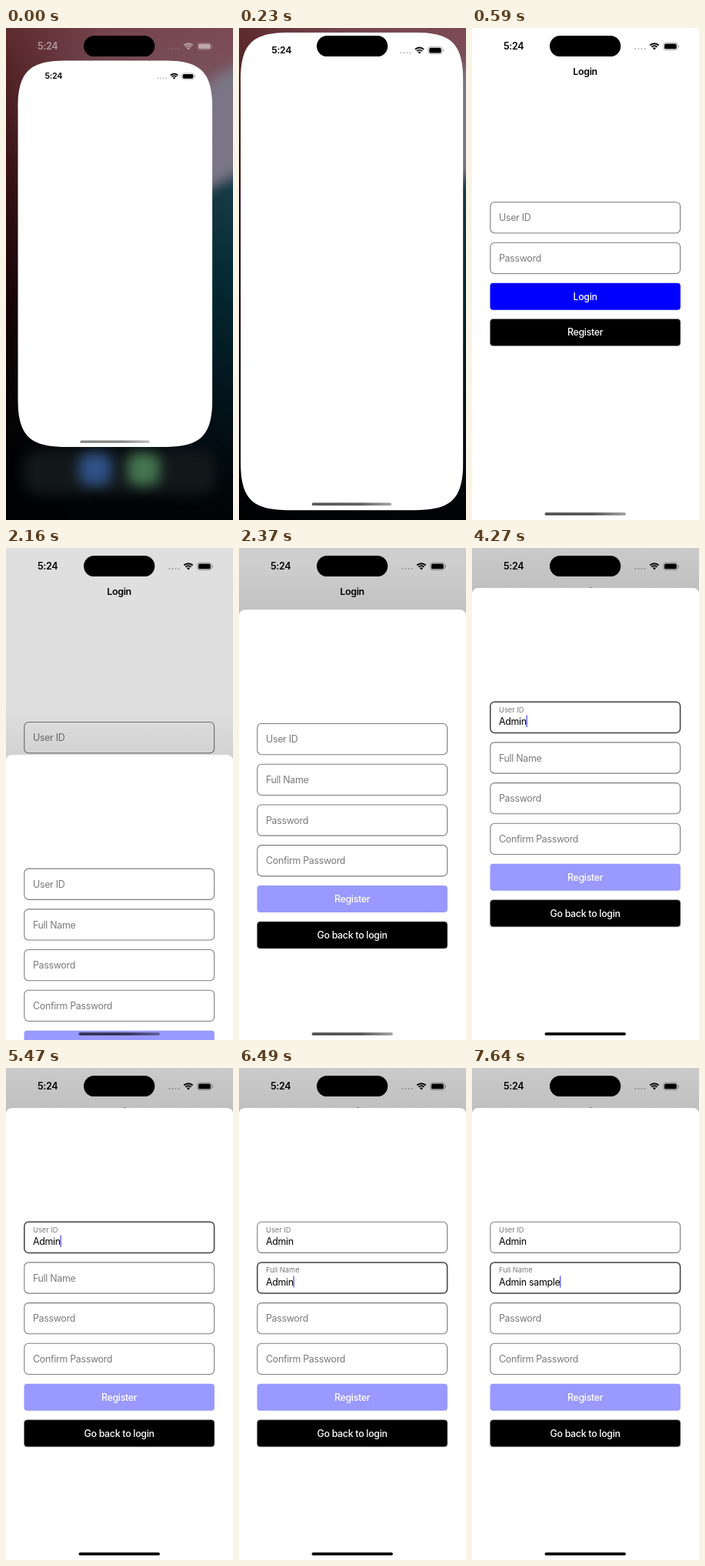
Recreate the animation shown at these times as an HTML page. Size 295x640 px, loop 8000 ms.

```html
<!DOCTYPE html>
<html lang="en">
<head>
<meta charset="utf-8">
<title>Sign-up flow</title>
<style>
  html, body { margin: 0; height: 100%; overflow: hidden; background: #fff; }
  svg { display: block; width: 100vw; height: 100vh; font-family: Inter, Roboto, sans-serif; }
  text { white-space: pre; }
</style>
</head>
<body>
<svg viewBox="0 0 295 640">
  <defs>
    <linearGradient id="left" x2="0" y2="1">
      <stop offset="0" stop-color="#5f2c2f"/>
      <stop offset=".1" stop-color="#512225"/>
      <stop offset=".3" stop-color="#381013"/>
      <stop offset=".55" stop-color="#190406"/>
      <stop offset=".75" stop-color="#060304"/>
      <stop offset="1" stop-color="#010305"/>
    </linearGradient>
    <linearGradient id="right" x2="0" y2="1">
      <stop offset="0" stop-color="#7c4a54"/>
      <stop offset=".08" stop-color="#7a525d"/>
      <stop offset=".2" stop-color="#756a78"/>
      <stop offset=".33" stop-color="#163a47"/>
      <stop offset=".5" stop-color="#052b36"/>
      <stop offset=".75" stop-color="#03141b"/>
      <stop offset="1" stop-color="#010305"/>
    </linearGradient>
    <linearGradient id="across">
      <stop offset="0" stop-color="#fff" stop-opacity="0"/>
      <stop offset=".45" stop-color="#fff" stop-opacity=".8"/>
      <stop offset="1" stop-color="#fff"/>
    </linearGradient>
    <linearGradient id="bar">
      <stop offset="0" stop-opacity=".68"/>
      <stop offset=".6" stop-opacity=".66"/>
      <stop offset="1" stop-opacity=".36"/>
    </linearGradient>
    <linearGradient id="shade" x2="0" y2="1">
      <stop offset="0" stop-opacity="0"/>
      <stop offset="1" stop-opacity=".07"/>
    </linearGradient>
    <filter id="soft" x="-60%" y="-60%" width="220%" height="220%" color-interpolation-filters="sRGB">
      <feGaussianBlur stdDeviation="8"/>
    </filter>
    <mask id="fade"><rect width="295" height="640" fill="url(#across)"/></mask>
    <clipPath id="window"><path/></clipPath>
  </defs>
  <g id="scene"></g>
</svg>
<script>
const LOOP = 8000;
// The screen refreshes only at these moments.
const TICKS = [0, 110, 220, 330, 440, 590, 2050, 2160, 2260, 2370, 2470, 2740,
  3290, 3390, 3500, 3600, 3740, 3850, 3990, 4150, 4270, 4880, 5120, 5240,
  5470, 5580, 5690, 5800, 6020, 6130, 6240, 6350, 6490, 6630, 6750, 6870, 7060, 7160, 7640];
const USER_KEYS = [3740, 3850, 3990, 4150, 4270];
const NAME_KEYS = [6020, 6130, 6350, 6490, 6490, 6630, 6630, 6750, 6870, 7060, 7160, 7640];

const scene = document.getElementById('scene');
const clip = document.querySelector('#window path');

const lerp = (a, b, p) => a + (b - a) * p;
const clamp = v => Math.min(1, Math.max(0, v));
const easeOut = p => 1 - (1 - clamp(p)) ** 3;
const typed = (str, keys, t) => str.slice(0, keys.filter(k => k <= t).length);

const rect = (x, y, w, h, r, fill, extra = '') =>
  `<rect x="${x}" y="${y}" width="${w}" height="${h}" rx="${r}" fill="${fill}" ${extra}/>`;

const text = (x, y, str, fill, size = 12.4, extra = '', spacing = -.3) =>
  `<text x="${x}" y="${y}" fill="${fill}" font-size="${size}" letter-spacing="${spacing}" ${extra}>${str}</text>`;

const centered = (y, str, fill, weight) =>
  text(147.1, y, str, fill, 12.4, `text-anchor="middle" font-weight="${weight}"`);

// Rectangle with continuous corners: each curve reaches e along the sides.
function squircle(x, y, w, h, e) {
  const k = e * .77, m = e - k;
  return `M${x} ${y + e}c0 ${-k} ${m} ${-e} ${e} ${-e}h${w - 2 * e}c${k} 0 ${e} ${m} ${e} ${e}` +
    `v${h - 2 * e}c0 ${k} ${-m} ${e} ${-e} ${e}h${2 * e - w}c${-k} 0 ${-e} ${-m} ${-e} ${-e}z`;
}

function statusBar(color) {
  const arc = r => {
    const d = r * .707;
    return `<path d="M${237 - d} ${28.2 - d}A${r} ${r} 0 0 1 ${237 + d} ${28.2 - d}" fill="none" stroke="${color}" stroke-width="1.9"/>`;
  };
  const dots = [212.3, 216.4, 220.5, 224.6].map(x => `<circle cx="${x}" cy="27" r="1" fill="${color}" opacity=".3"/>`);
  return text(41, 28.2, '5:24', color, 12.5, 'font-weight="600"', -.3) + dots.join('') +
    arc(8) + arc(4.9) + `<path d="M237 28.4l-2 -2.2a3 3 0 0 1 4 0z" fill="${color}"/>` +
    rect(248.7, 19.2, 18.4, 9.4, 3, 'none', `stroke="${color}" stroke-opacity=".4" stroke-width=".8"`) +
    rect(250, 20.5, 15.8, 6.8, 1.9, color) +
    `<path d="M268.1 22.4a1.6 1.6 0 0 1 0 3z" fill="${color}" opacity=".45"/>`;
}

function field(y, label, lift = 0, focus = 0, value = '', active = false) {
  const tone = lerp(125, 65, focus);
  return rect(23.8, y + .4, 246.8, 40.2, 5.5, '#fff',
      `stroke="rgb(${tone},${tone},${tone})" stroke-width="${lerp(1.1, 1.5, focus)}"`) +
    text(35, y + lerp(25.2, 13.8, lift), label, '#7a7a7a', lerp(12.4, 9.3, lift), '', lerp(-.3, 0, lift)) +
    text(35, y + 30.2, value, '#000', 12.4, active ? 'id="value"' : '');
}

const button = (y, label, fill, edge = 'none') =>
  rect(23.5, y, 247.4, 35, 4, fill, `stroke="${edge}" stroke-width=".6"`) + centered(y + 21.9, label, '#fff', 500);

const wallpaper = () =>
  rect(0, 0, 295, 640, 0, 'url(#left)') +
  rect(0, 0, 295, 640, 0, 'url(#right)', 'mask="url(#fade)"') +
  '<path d="M256 75L330 30V172L250 218z" fill="#7a7685" filter="url(#soft)"/>' +
  rect(24, 550, 248, 56, 18, '#13191b', 'filter="url(#soft)"') +
  rect(95, 553, 42, 42, 14, '#2f5186', 'filter="url(#soft)"') +
  rect(158, 553, 42, 42, 14, '#44754f', 'filter="url(#soft)"') +
  `<g opacity=".5">${statusBar('#fff')}</g>`;

const loginPage = () =>
  centered(61.4, 'Login', '#000', 600) +
  field(226.1, 'User ID') + field(278.9, 'Password') +
  button(331.7, 'Login', '#00f') + button(378.5, 'Register', '#000', '#888');

function sheet(t) {
  const wt = (t - 1990) * .0126;
  const rest = t < 2740 ? (1 + wt) * Math.exp(-wt) : 0;
  const top = lerp(52, 640, rest);
  const first = easeOut((t - 3260) / 330);
  const second = easeOut((t - 5470) / 320);
  const onName = t > 5470;
  const blink = t >= 4880 && t < 5120 ? 0 : t >= 5120 && t < 5240 ? .5 : 1;
  const caretY = onName ? 218.2 : 165.5;
  return rect(0, 0, 295, 640, 0, '#000', `opacity="${.2 * (1 - rest)}"`) +
    rect(0, top - 60, 295, 70, 0, 'url(#shade)') +
    `<g transform="translate(0 ${top})">` +
    rect(0, 0, 295, 700, 7.5, '#fff') +
    field(147.8, 'User ID', first, first - second, typed('Admin', USER_KEYS, t), !onName) +
    field(200.5, 'Full Name', second, second, typed('Admin sample', NAME_KEYS, t), onName) +
    field(253.2, 'Password') + field(305.9, 'Confirm Password') +
    button(358.7, 'Register', '#99f') + button(405.7, 'Go back to login', '#000', '#888') +
    (t >= 3290 ? rect(35, caretY, 1.4, 15.6, .7, '#5c5cff', `id="caret" opacity="${blink}"`) : '') +
    '</g>';
}

function draw(t) {
  const open = t < 590 ? 1 - Math.exp(-t / 110) : 1;
  const x = lerp(15.3, 0, open), y = lerp(42.3, 0, open);
  const w = lerp(253, 295, open), h = lerp(502.7, 640, open);
  const scale = w / 295, bottom = h / scale;
  clip.setAttribute('d', squircle(x, y, w, h, open < 1 ? 64 : 0));

  scene.innerHTML = (open < 1 ? wallpaper() : '') +
    `<g clip-path="url(#window)"><g transform="translate(${x} ${y}) scale(${scale})">` +
    rect(0, 0, 295, 640, 0, '#fff') +
    `<g opacity="${clamp((t - 330) / 260)}">${loginPage()}</g>` +
    (t >= 2050 ? sheet(t) : '') + statusBar('#000') +
    rect(94.5, bottom - 9.8, 105.5, 3.8, 1.9, t < 3390 ? 'url(#bar)' : '#000', `opacity="${lerp(.72, 1, open)}"`) +
    '</g></g>' + rect(101, 10, 92.3, 27.1, 13.55, '#000');

  const caret = document.getElementById('caret');
  if (caret) caret.setAttribute('x', 34.6 + document.getElementById('value').getComputedTextLength());
}

let shown;
function frame(now) {
  const t = TICKS.filter(tick => tick <= now % LOOP).pop();
  if (t !== shown) draw(shown = t);
  requestAnimationFrame(() => frame(performance.now() - start));
}
const start = performance.now();
frame(0);
</script>
</body>
</html>
```
